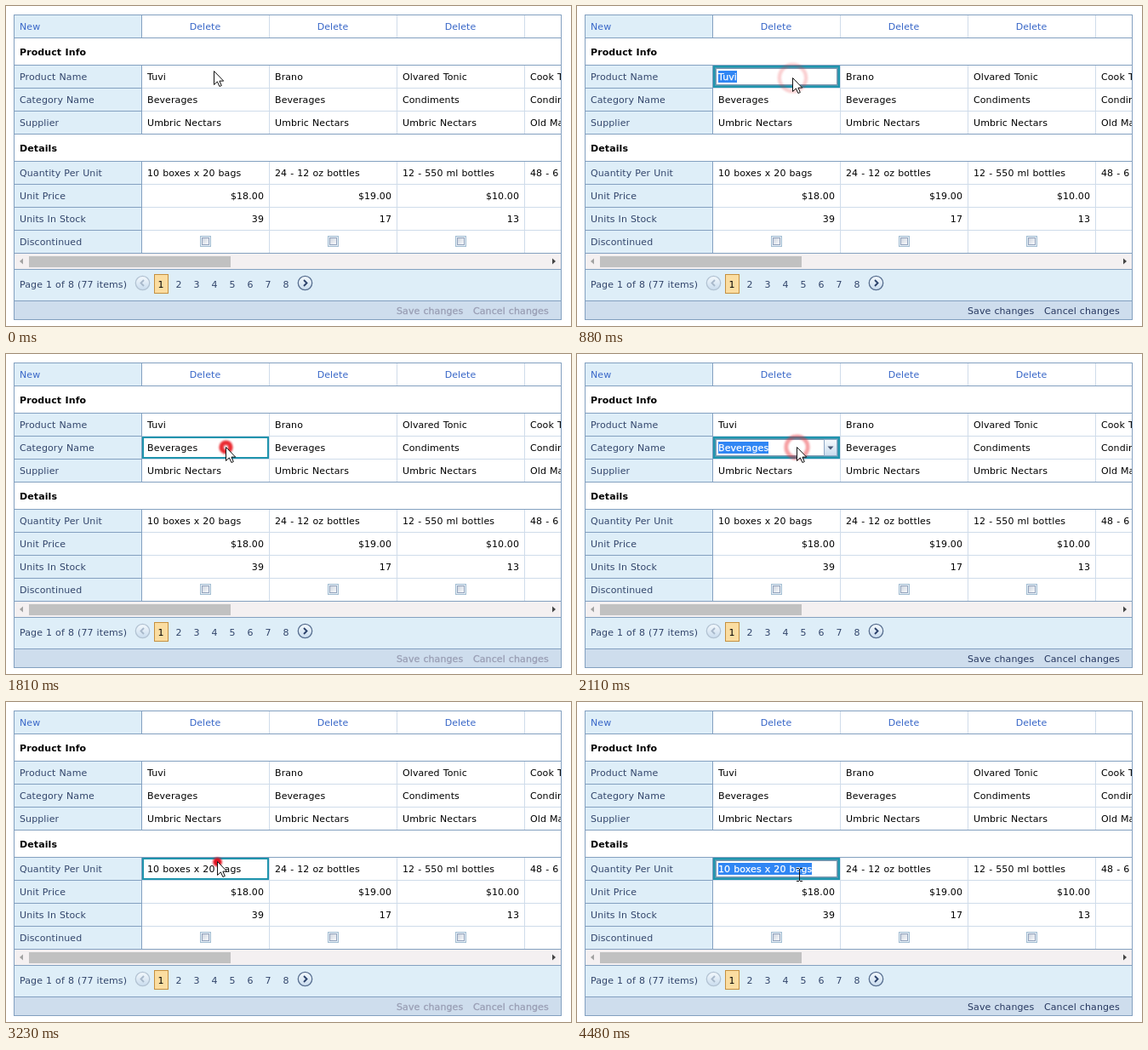
Animation, 664 px wide and 376 px high, one loop 4510 ms. Source, as an HTML page:

```html
<!DOCTYPE html>
<html lang="en">
<head>
<meta charset="utf-8">
<title>Vertical grid editing</title>
<style>
  html, body { margin: 0; width: 100%; height: 100%; overflow: hidden; background: #fff; }
  svg { display: block; position: absolute; left: 0; top: 0; }
  rect { shape-rendering: crispEdges; }
  text {
    font: 11px "DejaVu Sans", Verdana, sans-serif;
    letter-spacing: .1px; word-spacing: .4px; white-space: pre;
  }
  .bold { font-weight: bold; }
  .off { stroke: #9a9fb5; stroke-width: .35px; }
  .picked { stroke: #fff; stroke-width: .25px; }
</style>
</head>
<body>
<svg id="stage" width="664" height="376" viewBox="0 0 664 376">
  <defs>
    <clipPath id="inside"><rect x="9" y="10" width="643" height="359"/></clipPath>
    <linearGradient id="button" x2="0" y2="1">
      <stop stop-color="#f4f9fd"/><stop offset="1" stop-color="#c9dcee"/>
    </linearGradient>
    <linearGradient id="tick" x2="1" y2="1">
      <stop stop-color="#cfd6e0"/><stop offset="1" stop-color="#f8f9fb"/>
    </linearGradient>
    <filter id="soft" x="-100%" y="-100%" width="300%" height="300%">
      <feGaussianBlur stdDeviation="1.1"/>
    </filter>
  </defs>
</svg>
<script>
const LOOP = 4510, RIPPLE = 690, EDIT_DELAY = 390;
const BORDER = '#83a0c0', GRID = '#cfdcea', HEAD = '#deeef8', LABEL = '#32456b',
      LINK = '#3a68c8', INK = '#000', TEAL = '#1f94ad', OFF = '#9a9fb5';
const stage = document.getElementById('stage');

function add(parent, tag, attrs, content) {
  const el = document.createElementNS('http://www.w3.org/2000/svg', tag);
  for (const k in attrs) el.setAttribute(k, attrs[k]);
  if (content !== undefined) el.textContent = content;
  return parent.appendChild(el);
}
const group = (parent, attrs) => add(parent, 'g', attrs);
const box = (parent, x, y, width, height, fill) =>
  add(parent, 'rect', { x, y, width, height, fill });
const frame = (parent, x, y, w, h, line, fill, t = 1) => {
  box(parent, x, y, w, h, line);
  return box(parent, x + t, y + t, w - 2 * t, h - 2 * t, fill);
};
const path = (parent, d, attrs) => add(parent, 'path', { d, ...attrs });
const label = (parent, x, mid, str, fill = INK, anchor = 'start', cls = '') =>
  add(parent, 'text', { x, y: mid + 4, fill, 'text-anchor': anchor, class: cls }, str);
const show = (el, on) => el.setAttribute('visibility', on ? 'visible' : 'hidden');

// Table
const grid = group(stage, { 'clip-path': 'url(#inside)' });
const rows = [
  [70, 'Product Name', ['Tuvi', 'Brano', 'Olvared Tonic', 'Cook Tobbin']],
  [97, 'Category Name', ['Beverages', 'Beverages', 'Condiments', 'Condiments']],
  [124, 'Supplier', ['Umbric Nectars', 'Umbric Nectars', 'Umbric Nectars', 'Old Marrow']],
  [183, 'Quantity Per Unit', ['10 boxes x 20 bags', '24 - 12 oz bottles', '12 - 550 ml bottles', '48 - 6 oz jars']],
  [210, 'Unit Price', ['$18.00', '$19.00', '$10.00'], true],
  [237, 'Units In Stock', ['39', '17', '13'], true],
  [264, 'Discontinued', []]
];

function rowBase(y) {
  box(grid, 10, y, 149, 26, HEAD);
  box(grid, 10, y + 26, 149, 1, BORDER);
  box(grid, 160, y + 26, 492, 1, GRID);
  for (const x of [309, 459, 609]) box(grid, x, y, 1, 27, GRID);
  box(grid, 159, y, 1, 27, BORDER);
}

rowBase(11);
label(grid, 16, 24, 'New', LINK);
for (const x of [234, 384, 534]) label(grid, x, 24, 'Delete', LINK, 'middle');

for (const [y, name, cells, right] of rows) {
  rowBase(y);
  label(grid, 16, y + 13, name, LABEL);
  cells.forEach((str, i) =>
    label(grid, (right ? 303 : 166) + 150 * i, y + 13, str, INK, right ? 'end' : 'start'));
}
for (const x of [228, 378, 528]) {
  frame(grid, x, 270, 13, 13, '#a3bdd2', '#e6eff6');
  frame(grid, x + 2, 272, 9, 9, '#93a3bd', 'url(#tick)');
}
for (const y of [37, 69, 150, 182, 290]) box(grid, 10, y, 642, 1, BORDER);
label(grid, 16, 54, 'Product Info', INK, 'start', 'bold');
label(grid, 16, 167, 'Details', INK, 'start', 'bold');

// Scrollbar
box(grid, 10, 291, 642, 18, '#f4f0f1');
box(grid, 27, 294, 237, 13, '#c1c1c1');
path(grid, 'M20 296.5v7l-4-3.5z', { fill: '#a3a3a3' });
path(grid, 'M642 296.5v7l4-3.5z', { fill: '#444' });

// Pager
box(grid, 10, 309, 642, 1, BORDER);
box(grid, 10, 310, 642, 36, HEAD);
label(grid, 16, 327, 'Page 1 of 8 (77 items)', LABEL);
frame(grid, 174, 315, 17, 23, '#c5903f', '#fbdda1');
for (let n = 1; n <= 8; n++)
  label(grid, 161 + 21 * n, 327, n, n === 1 ? INK : LABEL, 'middle');

function arrowButton(cx, dir, line, mark) {
  add(grid, 'circle', { cx, cy: 325.5, r: 8.2, fill: 'url(#button)', stroke: line, 'stroke-width': 1.3 });
  path(grid, `M${cx - 1.5 * dir} 322l${3.5 * dir} 3.5l${-3.5 * dir} 3.5`,
    { fill: 'none', stroke: mark, 'stroke-width': 1.9 });
}
arrowButton(160.5, -1, '#b3c3d3', '#a9b9cb');
arrowButton(351.5, 1, '#586f90', '#2c426b');

// Command bar
box(grid, 10, 346, 642, 1, BORDER);
box(grid, 10, 347, 642, 21, '#cedded');
const commands = [['Save changes', 459], ['Cancel changes', 549]]
  .map(([str, x]) => label(grid, x, 358, str));

for (const [x, y, w, h] of [[9, 10, 644, 1], [9, 368, 644, 1], [9, 10, 1, 359], [652, 10, 1, 359]])
  box(stage, x, y, w, h, BORDER);

// Focused cells and their editors
const clicks = [
  { at: 310, row: 0, x: 253.5, y: 84.5 },
  { at: 1660, row: 1, x: 258.5, y: 109.5, list: true },
  { at: 3200, row: 3, x: 248.5, y: 188 }
];
clicks.forEach((c, i) => {
  const [top, , cells] = rows[c.row];
  c.top = top;
  c.from = c.at - 30;
  c.to = i + 1 < clicks.length ? clicks[i + 1].at - 30 : LOOP;

  c.focus = group(stage);
  for (const [x, y, w, h] of [[160, 0, 149, 2], [160, 24, 149, 2], [160, 0, 2, 26], [307, 0, 2, 26]])
    box(c.focus, x, top + y, w, h, TEAL);

  c.editor = group(stage);
  frame(c.editor, 162, top + 2, 145, 22, '#4a9ab2', '#fff');
  frame(c.editor, 163, top + 3, 143, 20, '#7f97b0', '#fff');
  const mark = box(c.editor, 166, top + 6, 0, 14, '#3086f4');
  const str = label(c.editor, 166, top + 13, cells[0], '#fff', 'start', 'picked');
  mark.setAttribute('width', Math.round(str.getComputedTextLength()));
  if (c.list) {
    frame(c.editor, 290, top + 3, 16, 20, '#8fa9c6', 'url(#button)');
    path(c.editor, `M294.5 ${top + 11.5}h7l-3.5 4z`, { fill: '#4a5a78' });
  }
});

const ripple = add(stage, 'circle', { fill: 'none', filter: 'url(#soft)' });

// Pointers
const arrow = group(stage);
path(arrow, 'M.5 .5V16.5L4.4 12.9L6.9 18.5L9.3 17.5L6.9 12.1H11.7Z',
  { fill: '#fff', stroke: '#111', 'stroke-width': 1 });
const beam = group(stage);
for (const [x, y, w, h] of [[-3, -8, 3, 1], [1, -8, 3, 1], [0, -7, 1, 14], [-3, 7, 3, 1], [1, 7, 3, 1]])
  box(beam, x, y, w, h, '#111');

// [start, end, from x, from y, to x, to y]
const moves = [
  [0, 120, 244, 76, 253, 84],
  [1200, 1530, 253, 84, 258, 109],
  [2650, 3020, 258, 109, 248, 187],
  [4290, 4480, 255, 196, 261, 203]
];

function draw(t) {
  const cell = clicks.find(c => t >= c.from && t < c.to);
  const editing = !!cell && t >= cell.at + EDIT_DELAY;
  for (const c of clicks) {
    show(c.focus, c === cell);
    show(c.editor, c === cell && editing);
  }
  for (const el of commands) {
    el.setAttribute('fill', editing ? '#26375f' : OFF);
    el.setAttribute('class', editing ? '' : 'off');
  }

  const hit = clicks.find(c => t >= c.at && t < c.at + RIPPLE);
  show(ripple, hit);
  if (hit) {
    const p = (t - hit.at) / RIPPLE;
    const attrs = {
      cx: hit.x, cy: hit.y, r: 1.6 + 17 * p, stroke: p < .2 ? '#e00c1c' : '#ea2a30',
      'stroke-width': 6 - 2 * p, opacity: Math.min(1, 1.3 * (1 - p))
    };
    for (const k in attrs) ripple.setAttribute(k, attrs[k]);
  }

  const m = moves.filter(v => t >= v[0]).pop();
  const p = 1 - Math.pow(1 - Math.min(1, (t - m[0]) / (m[1] - m[0])), 1.4);
  const x = Math.round(m[2] + (m[4] - m[2]) * p);
  const y = Math.round(m[3] + (m[5] - m[3]) * p);
  const overText = editing && t > cell.at + RIPPLE && t >= m[0] && m[0] > cell.at &&
    y > cell.top + 2 && y < cell.top + 24;
  show(arrow, !overText);
  show(beam, overText);
  (overText ? beam : arrow).setAttribute('transform', `translate(${x} ${y})`);
}

const start = performance.now();
function tick() {
  draw((performance.now() - start) % LOOP);
  requestAnimationFrame(tick);
}
tick();
</script>
</body>
</html>
```
